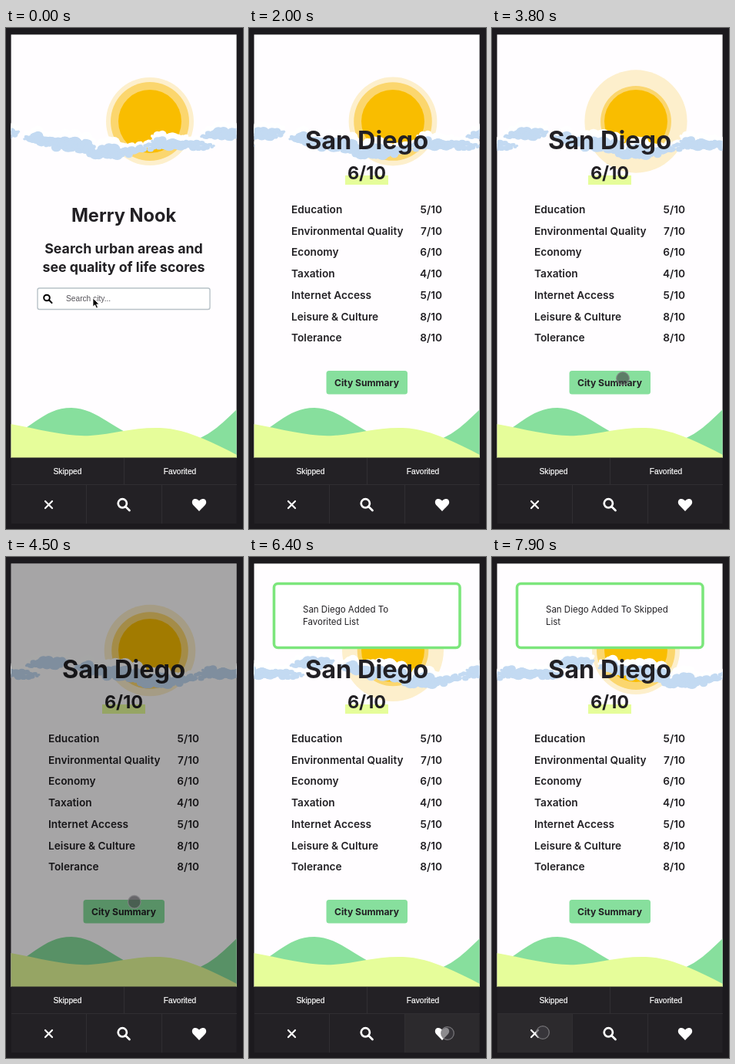
These frames come from a looping animation (308x649 px, 8 s). An HTML page:

```html
<!DOCTYPE html>
<html lang="en">
<head>
<meta charset="utf-8">
<title>City search</title>
<style>
  html, body { margin: 0; width: 100%; height: 100%; overflow: hidden; background: #1c1a1e; }
  svg { display: block; width: 308px; height: 649px; }
  text { font-family: Inter, sans-serif; fill: #222024; }
  .mid { text-anchor: middle; }
  .bold { font-weight: 700; }
  .ui { font: 10.2px "Liberation Sans", Arial, sans-serif; }
  .tab { stroke: #fff; stroke-width: .2; }
  .item { font-size: 9.45px; font-weight: 500; }
  .light { fill: #fff; }
  .row { font-size: 13.7px; font-weight: 600; }
  .line { fill: none; stroke: #fff; stroke-linecap: round; }
  #blue { filter: blur(.5px); }
</style>
</head>
<body>
<svg viewBox="0 0 308 649">
  <defs>
    <clipPath id="page"><path d="M6.6 8.4H299.6V557H6.6Z"/></clipPath>
    <g id="clouds"><g id="white" fill="#fff"/><g id="blue" fill="#c3daf2"/></g>
  </defs>

  <g clip-path="url(#page)">
    <path fill="#fffdff" d="M6 8H300V557H6Z"/>
    <circle id="halo" cx="187" cy="121" fill="#fdefcc"/>
    <circle id="ring" cx="187" cy="121" fill="#fbd66e"/>
    <circle cx="187" cy="121" r="41" fill="#f9bd00"/>
    <g id="drift"><use href="#clouds"/><use href="#clouds" x="-293"/></g>
    <path fill="#87df9d" d="M20 522C45 505 60 492 85 492S130 510 156 524V540H20ZM250 532C270 524 285 508 300 494V557H250Z"/>
    <path fill="#e6fd9a" d="M6 513C45 520 80 530 110 528S165 517 200 518S270 538 300 553V557H6Z"/>

    <g id="search">
      <text class="mid bold" x="153" y="251" font-size="23.6">Merry Nook</text>
      <g class="mid bold" font-size="17.75">
        <text x="153" y="292">Search urban areas and</text>
        <text x="153" y="316">see quality of life scores</text>
      </g>
      <rect id="field" x="41" y="337" width="224" height="27.5" rx="2.5" fill="#fff" stroke-width="1.4"/>
      <g fill="none" stroke="#000" stroke-width="2"><circle cx="53" cy="349.5" r="3.8"/><path d="M56 352.5L59.5 356" stroke-linecap="round"/></g>
      <text class="ui" id="query" x="78" y="354"/>
      <path id="caret" d="M95 345V356" stroke="#000"/>
      <path id="clear" d="M252.5 348.5L257.5 353.5M257.5 348.5L252.5 353.5" stroke="#2f5491" stroke-width="1.6"/>
      <g id="menu">
        <path fill="#232225" d="M124 372.5L131 365.5L138 372.5Z"/>
        <rect x="115" y="372" width="117" height="168" rx="3" fill="#232225"/>
      </g>
    </g>

    <g id="result">
      <text class="mid bold" x="153" y="156.5" font-size="32.5">San Diego</text>
      <path fill="#e6fd9a" d="M125 191H181V203H125Z"/>
      <text class="mid bold" x="153" y="195.5" font-size="23.4">6/10</text>
      <g id="scores"/>
      <rect x="100.5" y="444" width="105.5" height="30.5" rx="3.5" fill="#87df9d"/>
      <text class="mid bold" x="153" y="464" font-size="12.1">City Summary</text>
    </g>
    <path id="dim" d="M6 8H300V557H6Z"/>
    <g id="toast">
      <rect x="32.5" y="34.5" width="241.5" height="83" rx="5" fill="#fff" stroke="#7ce67c" stroke-width="3.6"/>
      <g font-size="11.5"><text id="note1" x="70" y="72"/><text id="note2" x="70" y="88"/></g>
    </g>
  </g>

  <path fill="#232125" d="M6.6 556.6H299.6V642H6.6Z"/>
  <path id="hoverX" fill="#2c2a2d" d="M7 592H104.5V642H7Z"/>
  <path id="hoverHeart" fill="#2c2a2d" d="M202 592H299.6V642H202Z"/>
  <path fill="none" stroke="#302e32" d="M7 591.5H300M153.5 557V591M104.5 592V642M202.5 592V642"/>
  <text class="ui tab mid light" x="80" y="577.5">Skipped</text>
  <text class="ui tab mid light" x="226" y="577.5">Favorited</text>
  <path class="line" stroke-width="2.2" d="M51 613L60 622M60 613L51 622"/>
  <g class="line" stroke-width="2.7"><circle cx="151.3" cy="615.8" r="5.6"/><path d="M155.7 620.2L160.5 625"/></g>
  <path fill="#fff" d="M251 626L243.5 618.2C240.5 615 241.8 610.7 245 610C247.5 609.5 249.3 610.6 251 612.6C252.7 610.6 254.5 609.5 257 610C260.2 610.7 261.5 615 258.5 618.2Z"/>

  <path id="arrow" d="M113 350V361L115.6 358.7L117.4 362.8L119.4 361.9L117.6 357.9H121Z" stroke="#fff" stroke-width=".8"/>
  <circle id="touch" r="8.3" fill="#403e42" fill-opacity=".6" stroke="#858387" stroke-opacity=".8" stroke-width="1.3"/>
</svg>
<script>
const LOOP = 8000, RESULT = 1850;
const $ = id => document.getElementById(id);
const clamp = x => Math.max(0, Math.min(1, x));
const ease = x => x * x * (3 - 2 * x);
const show = (id, on) => $(id).style.display = on ? '' : 'none';
const set = (id, attrs) => { for (const k in attrs) $(id).setAttribute(k, attrs[k]); };
const fade = (t, from, to) => clamp((t - from) / 100) * clamp((to - t) / 100);

function add(parent, tag, attrs, text = '') {
  const el = document.createElementNS('http://www.w3.org/2000/svg', tag);
  for (const k in attrs) el.setAttribute(k, attrs[k]);
  el.textContent = text;
  $(parent).append(el);
}

let seed = 7;
const rnd = () => (seed = seed * 16807 % 2147483647) / 2147483647;

// A lobe of ragged puffs, thick in the middle, with white tops
function cloud(x0, x1, y0, y1, size) {
  for (let x = x0 + 2; x <= x1 - 2; x += 2.2) {
    const u = (x - x0) / (x1 - x0);
    const body = size * Math.sin(Math.PI * u);
    const r = 1.2 + body * (.35 + .4 * rnd());
    const y = y0 + (y1 - y0) * u + (rnd() - .5) * (3 + body);
    add('white', 'circle', { cx: x, cy: y - size * .8, r: r * 1.25 });
    add('blue', 'ellipse', { cx: x, cy: y, rx: r * 1.2, ry: r });
  }
}
cloud(22, 66, 142, 146, 7);
cloud(48, 118, 150, 152, 10);
cloud(90, 162, 158, 162, 9);
cloud(140, 184, 163, 157, 5);
cloud(166, 216, 157, 150, 4);
cloud(188, 240, 148, 150, 8);
cloud(215, 272, 150, 154, 5);
cloud(252, 312, 140, 136, 7);

['san diego', 'san antonio', 'san francisco bay', 'san deigo', 'san francisco', 'San Frandisco, CA']
  .forEach((s, i) => add('menu', 'text', { class: 'item light', x: 124, y: 392 + 27 * i }, s));

Object.entries({ Education: 5, 'Environmental Quality': 7, Economy: 6, Taxation: 4,
  'Internet Access': 5, 'Leisure & Culture': 8, Tolerance: 8 }).forEach(([name, n], i) => {
  const y = 240 + 27.7 * i;
  add('scores', 'text', { class: 'row', x: 55, y }, name);
  add('scores', 'text', { class: 'row', x: 251, y, 'text-anchor': 'end' }, n + '/10');
});

// time, x, y
const path = [[2500, 152, 535], [3500, 170, 454], [4300, 170, 454], [5000, 154, 418],
  [5500, 154, 418], [6100, 258, 617], [6700, 258, 617], [7400, 66, 616], [8000, 66, 616]];

function touchAt(t) {
  const i = Math.max(1, path.findIndex(p => p[0] > t));
  const [a, b] = [path[i - 1], path[i]];
  const u = ease(clamp((t - a[0]) / (b[0] - a[0])));
  return [a[1] + (b[1] - a[1]) * u, a[2] + (b[2] - a[2]) * u];
}

// The glow swells once per cycle and rests between; the cycle restarts with the result page
function glow(t) {
  const d = t < RESULT ? t - 1150 : (t - 3950 + 3975) % 2650 - 1325;
  return Math.abs(d) < 800 ? (1 + Math.cos(Math.PI * d / 800)) / 2 : 0;
}

function draw(t) {
  const g = glow(t);
  set('halo', { r: 57 + 10.5 * g });
  set('ring', { r: 51 - 5.5 * g });
  set('drift', { transform: `translate(${t * .0146})` });

  const typed = t >= 1600 ? 'san diego' : 'san'.slice(0, Math.floor(clamp((t - 600) / 300) * 3));
  const focus = t >= 300;
  show('search', t < RESULT);
  show('result', t >= RESULT);
  set('field', { stroke: focus ? '#78d98c' : '#b8c2c8' });
  $('query').textContent = typed || 'Search city...';
  $('query').style.fill = typed ? '#000' : '#56545a';
  show('caret', focus);
  set('caret', { transform: `translate(${typed.length > 3 ? 28 : typed.length * 5.5 - 16.5})` });
  show('clear', typed);
  show('menu', typed && t < 1600);
  show('arrow', t < 600);

  set('dim', { opacity: .35 * fade(t, 4000, 5150) });

  const first = t < 7250;
  set('toast', { opacity: first ? fade(t, 6150, 7050) : clamp((t - 7500) / 100) });
  $('note1').textContent = 'San Diego Added To' + (first ? '' : ' Skipped');
  $('note2').textContent = first ? 'Favorited List' : 'List';

  const [x, y] = touchAt(t);
  show('touch', t >= 2500);
  set('touch', { cx: x, cy: y });
  show('hoverX', t > 2500 && y > 591 && x < 105);
  show('hoverHeart', t > 2500 && y > 591 && x > 202);
}

const start = performance.now();
function tick() {
  draw((performance.now() - start) % LOOP);
  requestAnimationFrame(tick);
}
tick();
</script>
</body>
</html>
```
